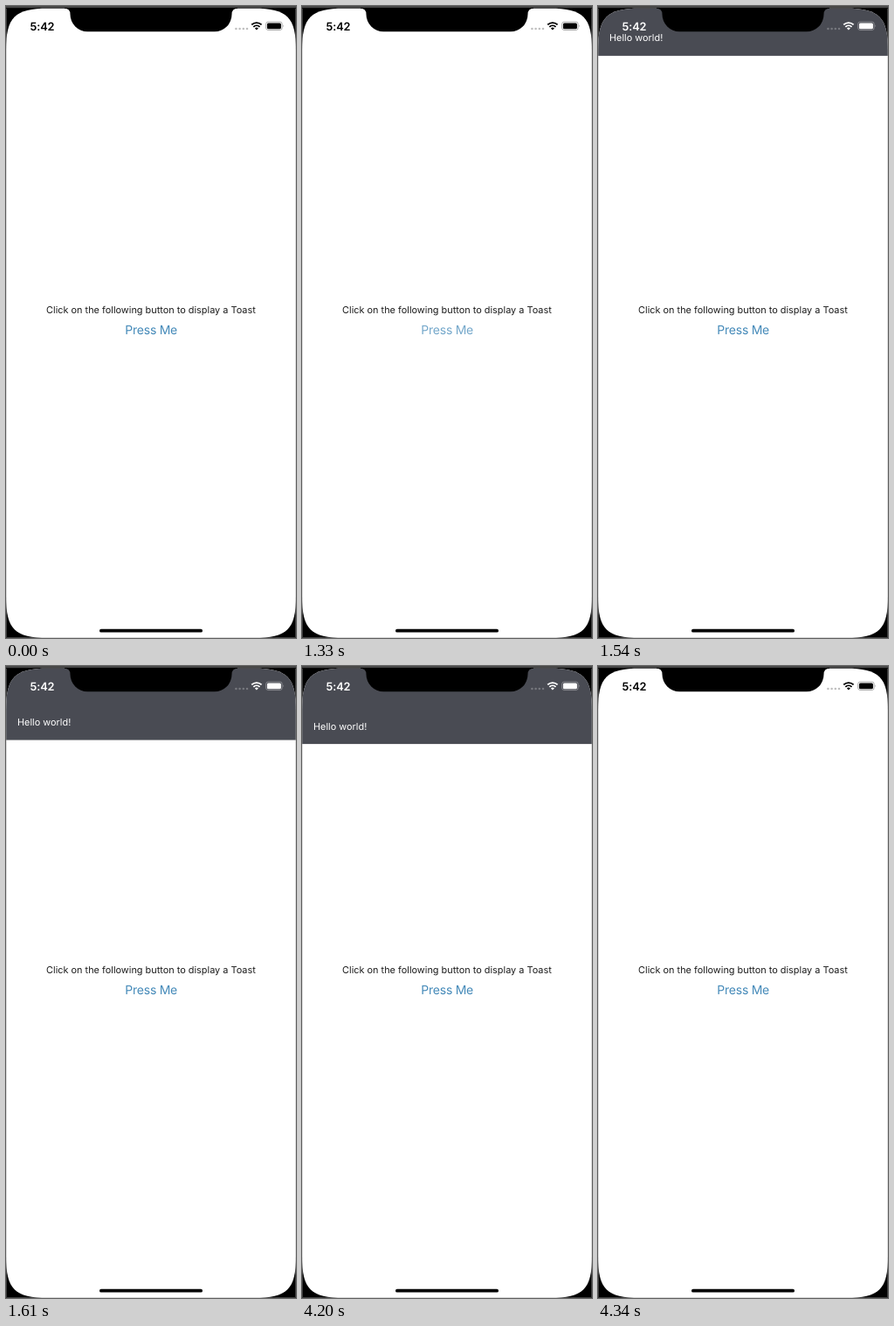
Recreate the animation shown at these times as an HTML page. Size 332 by 722 pixels, loop 5.67 s.

```html
<!DOCTYPE html>
<html lang="en">
<head>
<meta charset="utf-8">
<title>Toast demo</title>
<style>
  html, body { margin: 0; width: 100%; height: 100%; overflow: hidden; background: #000; }
  svg { display: block; width: 332px; height: 722px; }
  text { font-family: Inter, Roboto, "Liberation Sans", sans-serif; text-rendering: geometricPrecision; }
  .body { font-size: 10.9px; }
  .button { font-size: 14px; letter-spacing: -0.25px; }
  .clock { font-size: 12.8px; font-weight: 600; letter-spacing: -0.15px; }
</style>
</head>
<body>
<svg viewBox="0 0 332 722">
  <defs>
    <clipPath id="screen"><path id="outline"/></clipPath>
  </defs>
  <rect width="332" height="722" fill="#000"/>
  <rect width="332" height="2.2" fill="#484848"/>
  <g clip-path="url(#screen)">
    <rect width="332" height="722" fill="#fff"/>
    <text class="body" x="165.9" y="351.4" text-anchor="middle" fill="#1c1c1c">Click on the following button to display a Toast</text>
    <text id="button" class="button" x="166.2" y="375" text-anchor="middle" fill="#458ab9">Press Me</text>
    <rect x="107" y="711.8" width="118" height="3.8" rx="1.9"/>
    <g id="toast">
      <rect y="-20" width="332" height="109.5" fill="#494b53"/>
      <text class="body" x="13" y="73" fill="#fff">Hello world!</text>
    </g>
    <g id="status">
      <text class="clock" x="27.6" y="27.6">5:42</text>
      <path d="M263.4 26h0m4.2 0h0m4.2 0h0m4.2 0h0" stroke="currentColor" stroke-width="2.6" stroke-linecap="round" opacity="0.25"/>
      <g fill="none" stroke="currentColor" stroke-width="1.9">
        <path d="M281.2 21.4a8.2 8.2 0 0 1 11.4 0"/>
        <path d="M283.3 23.9a5.1 5.1 0 0 1 7.2 0"/>
      </g>
      <path d="M286.9 27.6l-2-2.1a2.9 2.9 0 0 1 4 0z"/>
      <rect x="297.6" y="18.1" width="18.6" height="9.4" rx="2.6" fill="none" stroke="currentColor" stroke-width="0.8" opacity="0.4"/>
      <rect x="298.9" y="19.4" width="16" height="6.8" rx="1.5"/>
      <path d="M317.2 21.3q1.3 1.5 0 3z" opacity="0.4"/>
    </g>
  </g>
  <path d="M67 2H265V2.8Q258.5 3 258.5 9.5A19.8 19.8 0 0 1 238.7 29.3H93.3A19.8 19.8 0 0 1 73.5 9.5Q73.5 3 67 2.8Z"/>
  <path d="M0.5 3V721.5H331.5V3" fill="none" stroke="#999" stroke-opacity="0.4"/>
</svg>
<script>
  const LOOP = 5670, STEP = 70, TRAVEL = 87;
  const [button, toast, status, outline] =
    ["button", "toast", "status", "outline"].map(id => document.getElementById(id));

  // Rounded screen with continuous-curvature corners.
  function screenPath(top, right, bottom, reach, pull) {
    return `M0 ${top + reach}C0 ${top + pull} ${pull} ${top} ${reach} ${top}` +
      `H${right - reach}C${right - pull} ${top} ${right} ${top + pull} ${right} ${top + reach}` +
      `V${bottom - reach}C${right} ${bottom - pull} ${right - pull} ${bottom} ${right - reach} ${bottom}` +
      `H${reach}C${pull} ${bottom} 0 ${bottom - pull} 0 ${bottom - reach}Z`;
  }
  outline.setAttribute("d", screenPath(2.8, 332, 722, 48, 10));

  const progress = (t, start, duration) => Math.min(1, Math.max(0, (t - start) / duration));
  const easeIn = p => p ** 1.75;
  const easeInOut = p => p < 0.5 ? easeIn(2 * p) / 2 : 1 - easeIn(2 - 2 * p) / 2;

  function draw(time) {
    const t = Math.floor((time % LOOP) / STEP) * STEP;

    const shown = easeInOut(progress(t, 1396, 250)) - easeInOut(progress(t, 4195, 145));
    toast.setAttribute("transform", `translate(0 ${(shown - 1) * TRAVEL})`);

    const color = t >= 1470 && t < 4340 ? "#fff" : "#000";
    status.setAttribute("color", color);
    status.setAttribute("fill", color);

    const released = easeInOut(progress(t, 1230, 240));
    button.setAttribute("opacity", t < 1260 ? 1 : 0.6 + 0.4 * released);
  }

  const origin = performance.now();
  function tick() {
    draw(performance.now() - origin);
    requestAnimationFrame(tick);
  }
  tick();
</script>
</body>
</html>
```
